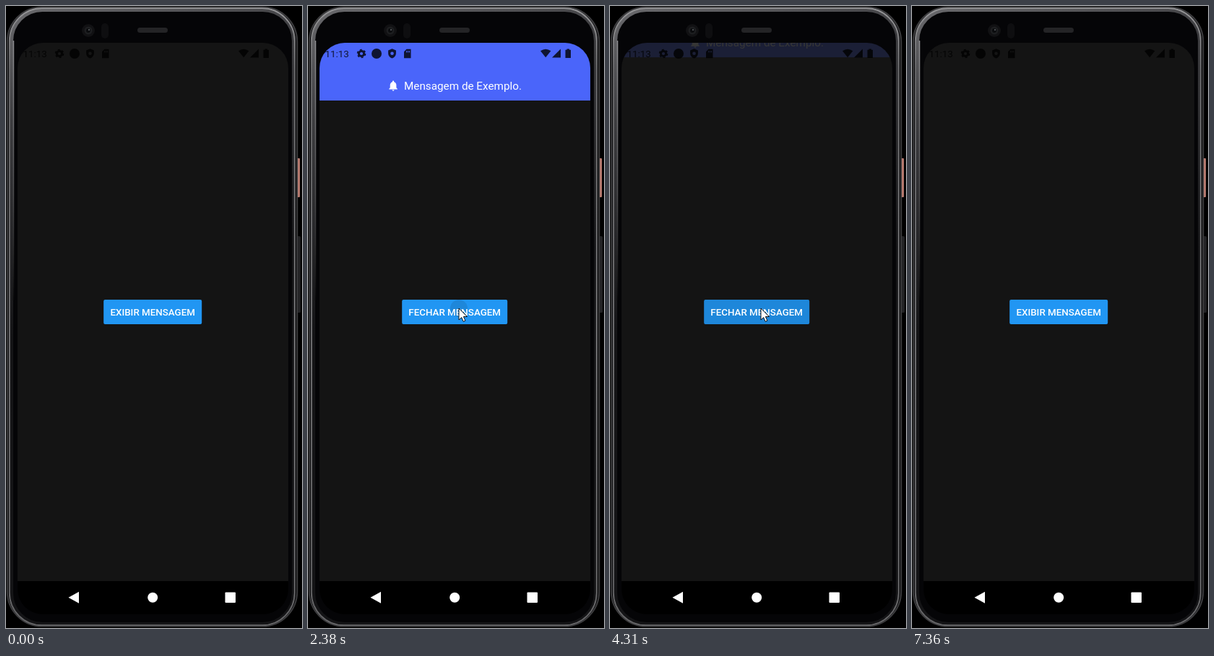
These frames come from a looping animation (410x862 px, 7690 ms). An HTML page:

```html
<!DOCTYPE html>
<html lang="pt-BR">
<head>
<meta charset="utf-8">
<title>Mensagem de Exemplo</title>
<style>
  html, body { margin: 0; width: 100%; height: 100%; overflow: hidden; background: #000; }
  svg { display: block; width: 410px; height: 862px; }
  text { font-family: Roboto, Arial, sans-serif; }
</style>
</head>
<body>
<svg viewBox="0 0 410 862">
  <defs>
    <linearGradient id="rim" x1="0" y1="0" x2="0" y2="1">
      <stop offset="0" stop-color="#98989a"/>
      <stop offset=".1" stop-color="#68686a"/>
      <stop offset=".55" stop-color="#7a7a7c"/>
      <stop offset="1" stop-color="#666668"/>
    </linearGradient>
    <linearGradient id="bevel" gradientUnits="userSpaceOnUse" x1="0" y1="0" x2="130" y2="420">
      <stop offset="0" stop-color="#6c6c6f"/>
      <stop offset=".35" stop-color="#3c3c3f"/>
      <stop offset="1" stop-color="#141416"/>
    </linearGradient>
    <linearGradient id="shine" x1="0" y1="0" x2="0" y2="1">
      <stop offset="0" stop-color="#8a8a8d"/>
      <stop offset=".6" stop-color="#48484a"/>
      <stop offset="1" stop-color="#0a0a0b"/>
    </linearGradient>
    <clipPath id="screen"><rect x="16" y="51" width="375" height="792" rx="35"/></clipPath>
    <clipPath id="buttonClip"><rect id="buttonMask" y="407" height="34" rx="2"/></clipPath>
  </defs>

  <!-- phone body -->
  <rect x="403" y="211" width="4" height="54" rx="1" fill="#c08074"/>
  <rect x="403" y="319" width="5" height="106" rx="1.5" fill="#232325"/>
  <rect x="1.8" y="1.5" width="401.5" height="858" rx="48" fill="#08080a" stroke="#3c3c3e" stroke-width="2"/>
  <rect x="7.5" y="5.5" width="391" height="851" rx="43" fill="#050507" stroke="url(#bevel)" stroke-width="5"/>
  <rect x="4.8" y="3.2" width="395" height="855" rx="45" fill="none" stroke="url(#rim)" stroke-width="1.8"/>
  <rect x="9.6" y="48" width="1.6" height="360" fill="url(#shine)"/>
  <circle cx="114" cy="34" r="9" fill="#111113"/>
  <circle cx="114" cy="34" r="5.5" fill="#1d1e20"/>
  <circle cx="114" cy="34" r="3" fill="#0a0b0d"/>
  <circle cx="115" cy="33" r="1.2" fill="#4a4d50"/>
  <rect x="132" y="24" width="10" height="21" rx="5" fill="#0e0e10"/>
  <rect x="182" y="30" width="42" height="7" rx="3.5" fill="#242426"/>

  <g clip-path="url(#screen)">
    <rect x="16" y="51" width="375" height="746" fill="#141414"/>
    <rect x="16" y="797" width="375" height="46" fill="#000"/>
    <g id="banner">
      <rect x="16" y="51" width="375" height="80" fill="#4a65fa"/>
      <path transform="translate(109.4 101.8) scale(.72)" fill="#fff" d="M12 22c1.1 0 2-.9 2-2h-4c0 1.1.9 2 2 2zm6-6v-5c0-3.07-1.64-5.64-4.5-6.32V4c0-.83-.67-1.5-1.5-1.5s-1.5.67-1.5 1.5v.68C7.63 5.36 6 7.92 6 11v5l-2 2v1h16v-1l-2-2z"/>
      <text x="133" y="115.5" font-size="15.28" fill="#fff">Mensagem de Exemplo.</text>
    </g>

    <!-- status bar -->
    <g opacity=".8">
      <text x="23.5" y="70.8" font-size="13.37">11:13</text>
      <circle cx="74" cy="66" r="3.6" fill="none" stroke="#000" stroke-width="3"/>
      <circle cx="74" cy="66" r="5.4" fill="none" stroke="#000" stroke-width="1.8" stroke-dasharray="2.83 2.83"/>
      <circle cx="95" cy="66" r="7"/>
      <path fill-rule="evenodd" d="M116.5 59.2l5.4 2.3v4c0 3.3-2.3 6-5.4 6.9-3.1-.9-5.4-3.6-5.4-6.9v-4zM114.2 65.7a2.3 2.3 0 1 0 4.6 0a2.3 2.3 0 1 0-4.6 0z"/>
      <path fill-rule="evenodd" d="M136.5 59.7h6v12.5h-9.5v-9zM136 62v2.5h1V62zm2 0v2.5h1V62zm2 0v2.5h1V62z"/>
      <path d="M322 62.3q7.2-5.2 14.4 0L329.2 71.3z"/>
      <path d="M350 59.5V71.5H338z"/>
      <path d="M356.5 60.8h2v-1.4h3.5v1.4h2V72h-7.5z"/>
    </g>

    <g fill="#fff">
      <path d="M86.500 819.800L101 811.800V827.800z"/>
      <circle cx="203.2" cy="819.8" r="7"/>
      <rect x="303.5" y="812.5" width="14.5" height="14.5" rx="1"/>
    </g>

    <rect id="button" y="407" height="34" rx="2" fill="#2196f3"/>
    <circle id="ripple" clip-path="url(#buttonClip)"/>
    <text id="label" x="203.2" y="429" font-size="13.37" font-weight="500" fill="#fff" text-anchor="middle"></text>
  </g>
  <path id="cursor" d="M0 0V16L3.7 12.6 6.2 18.3 8.9 17.1 6.4 11.5H11.5z" fill="#fff" stroke="#111" stroke-width="1" stroke-linejoin="round"/>
</svg>
<script>
const LOOP = 7690;
const HEIGHT = 80;
const el = id => document.getElementById(id);
const clamp = v => Math.min(1, Math.max(0, v));
const progress = (t, start, length) => clamp((t - start) / length);

// time, x, y of the pointer tip
const track = [
  [70, 340, 811], [210, 265, 685], [340, 222, 563], [480, 213, 475], [680, 209, 419],
  [4590, 209, 419], [4660, 211, 441], [4800, 212, 449], [5070, 212, 449],
  [5160, 210, 453], [5420, 180, 423], [6380, 180, 423], [6450, 182, 445],
  [6600, 245, 500], [6720, 285, 537], [6860, 328, 632], [7000, 355, 702],
  [7080, 374, 742], [7220, 386, 823], [7360, 387, 850]
];

// press time, ripple spread start, banner start, ripple fade start
const presses = [
  { at: 880, spread: 950, act: 1306, fade: 1520, show: true },
  { at: 2380, spread: 2480, act: 2688, fade: 2900, show: false },
  { at: 3900, spread: 3940, act: 4248, fade: 4380, show: true },
  { at: 5750, spread: 5800, act: 5998, fade: 6200, show: false }
];

function pointerAt(t) {
  const i = Math.max(1, track.findIndex(k => k[0] >= t));
  const [a, b] = [track[i - 1], track[i]];
  const p = progress(t, a[0], b[0] - a[0]);
  return [a[1] + (b[1] - a[1]) * p, a[2] + (b[2] - a[2]) * p];
}

function bannerAt(t) {
  const last = presses.filter(p => t >= p.act).pop();
  if (!last) return { shown: false, place: 0, alpha: 0 };
  if (last.show) {
    const p = progress(t, last.act, 430);
    return { shown: true, place: 1 - (1 - p) ** (1.1 + 5 * p), alpha: p };
  }
  const p = progress(t, last.act, 400);
  return { shown: false, place: (1 - p) ** 1.3, alpha: 1 - p };
}

function set(node, attrs) {
  for (const name in attrs) node.setAttribute(name, attrs[name]);
}

function draw(t) {
  const { shown, place, alpha } = bannerAt(t);
  set(el("banner"), { transform: `translate(0 ${HEIGHT * (place - 1)})`, opacity: alpha });

  const box = shown ? { x: 130.2, width: 146 } : { x: 135.2, width: 136 };
  set(el("button"), box);
  set(el("buttonMask"), box);
  el("label").textContent = shown ? "FECHAR MENSAGEM" : "EXIBIR MENSAGEM";

  const visible = t >= 70 && t < 7350;
  const [x, y] = pointerAt(t);
  set(el("cursor"), { transform: `translate(${x} ${y})`, visibility: visible ? "visible" : "hidden" });

  const press = presses.filter(p => t >= p.at).pop();
  set(el("ripple"), press ? {
    cx: x, cy: y,
    r: 12 + 100 * progress(t, press.spread, 230),
    opacity: 0.1 * (1 - progress(t, press.fade, 240))
  } : { opacity: 0 });
}

const begin = performance.now();
function tick() {
  draw((performance.now() - begin) % LOOP);
  requestAnimationFrame(tick);
}
draw(0);
requestAnimationFrame(tick);
</script>
</body>
</html>
```
